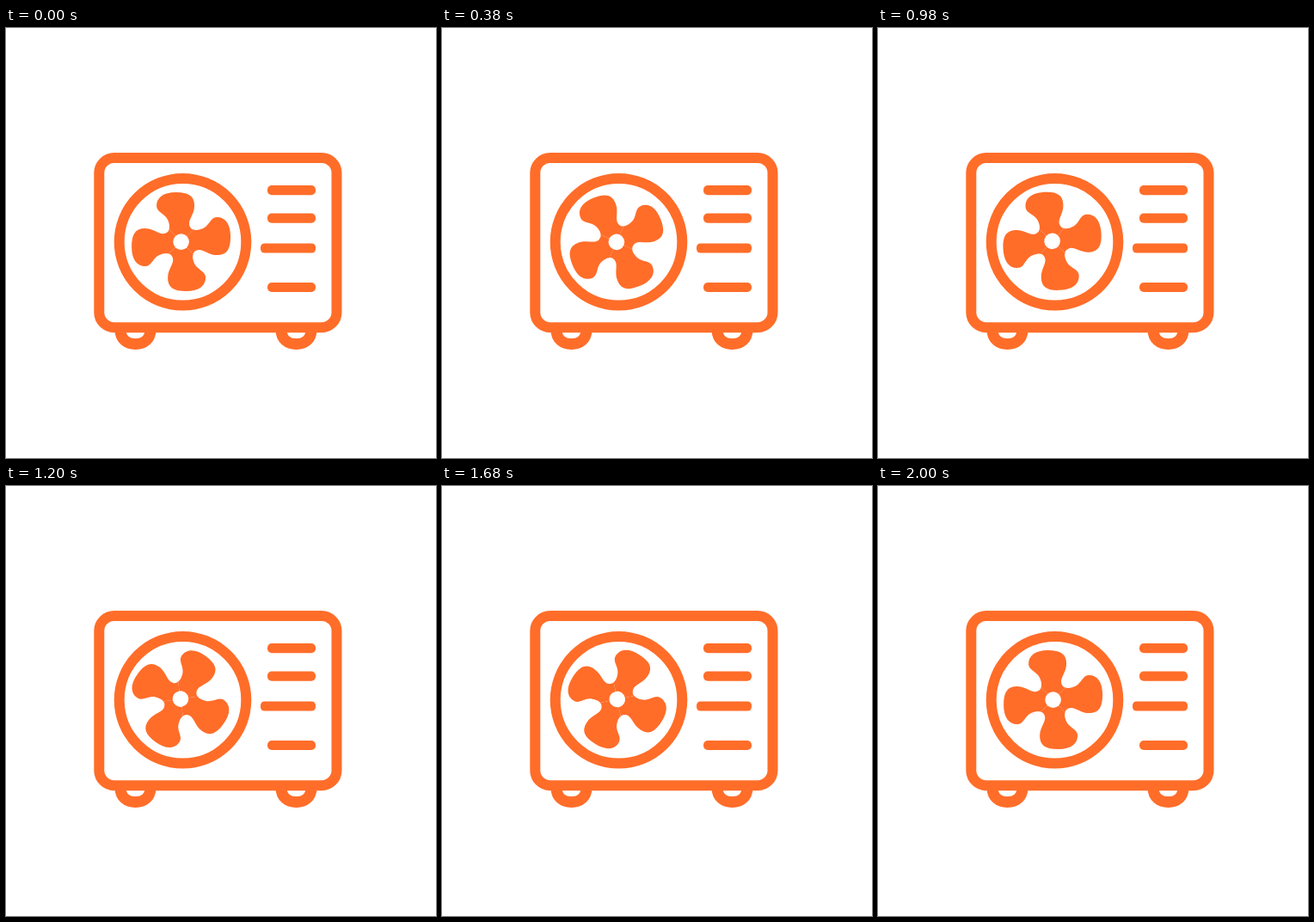
Write an HTML page that moves like this. It is 500x500 px and loops after 2040 ms.

```html
<!DOCTYPE html>
<html lang="en">
<head>
<meta charset="utf-8">
<title>Outdoor unit</title>
<style>
  html, body { margin: 0; width: 100%; height: 100%; overflow: hidden; background: #fff; }
  svg { display: block; width: 100vw; height: 100vh; }
  .line { fill: none; stroke: #ff6d29; stroke-width: 12; }
  .solid { fill: #ff6d29; }
</style>
</head>
<body>
<svg viewBox="0 0 500 500">
  <defs>
    <path id="blade" d="M0 0L-14-14.5C-13-17-13.5-21-15.5-25.5C-19-33-28-34-28.5-41
      C-29-51-21-57.5-6-57.5S15.5-53 15.5-42C15.5-31 7-25 10-18Q11.5-14.5 14.5-14Z"/>
    <path id="foot" d="M133 351C133 362 141 367.5 150.5 367.5S168 362 168 351" stroke-width="13"/>
  </defs>
  <g class="line">
    <use href="#foot"/>
    <use href="#foot" x="187"/>
    <rect x="108.3" y="151" width="276.2" height="197.2" rx="17.5"/>
    <circle cx="205.5" cy="248.8" r="73.8"/>
  </g>
  <g class="solid">
    <rect x="304" y="183" width="56" height="11.3" rx="5"/>
    <rect x="304" y="215.5" width="56" height="11.3" rx="5"/>
    <rect x="296" y="250.5" width="64" height="11" rx="4.5"/>
    <rect x="304" y="296" width="56" height="11" rx="5"/>
  </g>
  <g id="fan">
    <g class="solid" transform="translate(203.6 248.6)">
      <use href="#blade"/>
      <use href="#blade" transform="rotate(90)"/>
      <use href="#blade" transform="rotate(180)"/>
      <use href="#blade" transform="rotate(270)"/>
      <circle r="9.3" fill="#fff"/>
    </g>
  </g>
</svg>
<script>
  const LOOP = 2040, TURN = 2000, STEP = 20;
  const fan = document.getElementById('fan');
  const start = performance.now();

  // One clockwise turn in 20 ms steps, then a short rest before the loop restarts.
  function draw() {
    const t = (performance.now() - start) % LOOP;
    const time = Math.min(Math.floor(t / STEP) * STEP, TURN);
    fan.setAttribute('transform', `rotate(${time / TURN * 360} 203.1 248.2)`);
    requestAnimationFrame(draw);
  }
  draw();
</script>
</body>
</html>
```
